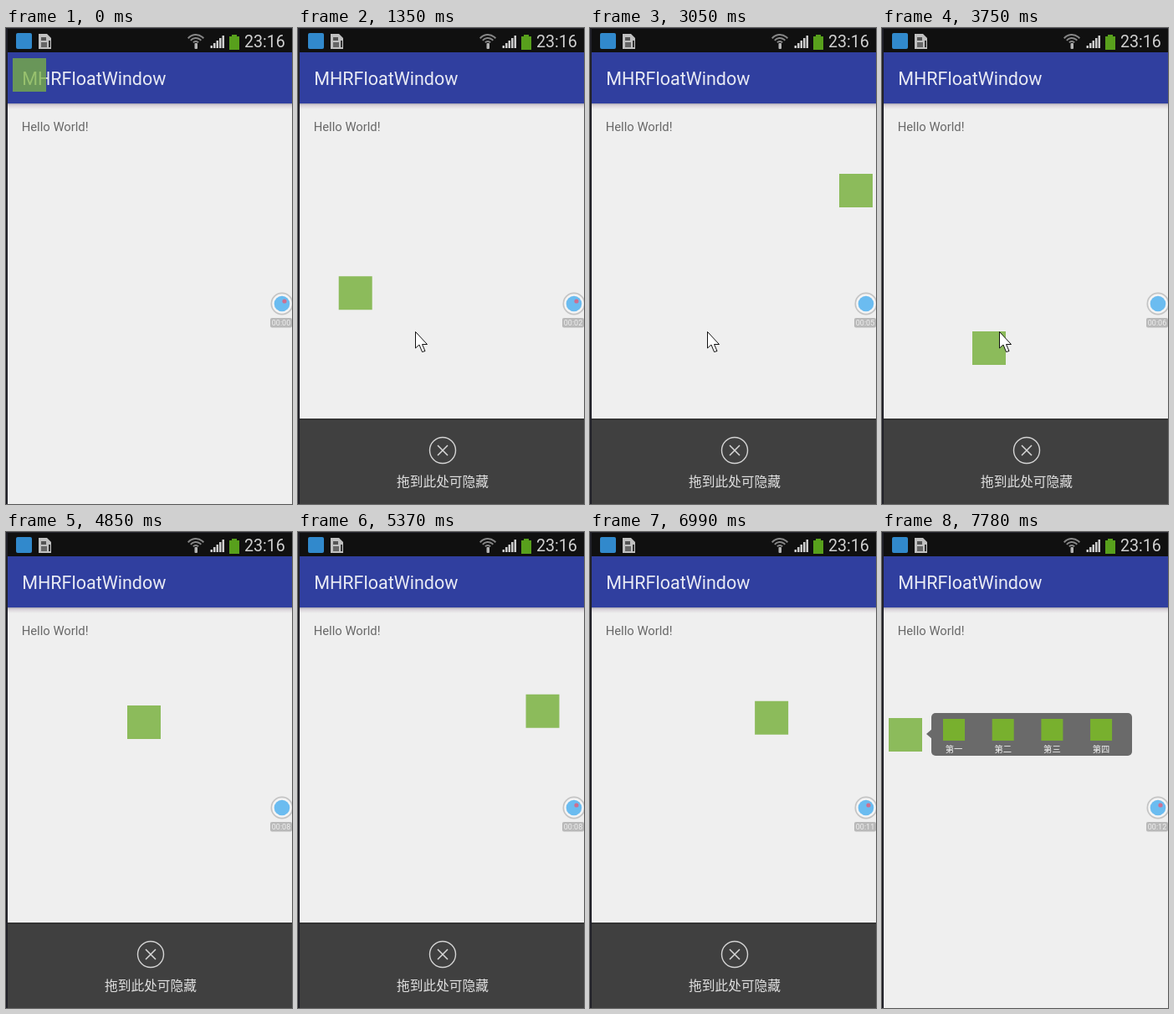
Recreate the animation shown at these times as an HTML page with a canvas. Size 342x568 px, loop 8000 ms.

```html
<!DOCTYPE html>
<html lang="zh">
<head>
<meta charset="utf-8">
<style>
html, body { margin: 0; width: 100%; height: 100%; overflow: hidden; background: #efefef; }
canvas { display: block; }
</style>
</head>
<body>
<canvas id="stage" width="342" height="568"></canvas>
<script>
const ctx = document.getElementById('stage').getContext('2d');
const LOOP = 8000;
const LATIN = 'Roboto, sans-serif';
const CJK = '"Noto Sans CJK SC", "Noto Sans CJK", sans-serif';

// Turning points of the drag: time, left, top
const PATH = [
  [720, 7, 33], [1850, 80, 500], [2050, 35, 517], [3050, 297, 171], [3500, 90, 389],
  [3750, 107, 359], [4150, 110, 500], [4850, 144, 204], [5450, 297, 188],
  [6790, 297, 188], [7250, 7, 219]
];
const within = (t, a, b) => t >= a && t < b;

function rect(x, y, w, h, color, r = 0) {
  ctx.fillStyle = color;
  ctx.beginPath();
  ctx.roundRect(x, y, w, h, r);
  ctx.fill();
}
function disc(x, y, r, color) {
  ctx.fillStyle = color;
  ctx.beginPath();
  ctx.arc(x, y, r, 0, 7);
  ctx.fill();
}
function arc(x, y, r, from, to, color, width) {
  ctx.strokeStyle = color;
  ctx.lineWidth = width;
  ctx.beginPath();
  ctx.arc(x, y, r, from, to);
  ctx.stroke();
}
function shape(points, fill, stroke) {
  ctx.beginPath();
  points.forEach(([x, y]) => ctx.lineTo(x, y));
  ctx.closePath();
  ctx.fillStyle = fill;
  ctx.fill();
  if (stroke) {
    ctx.strokeStyle = stroke;
    ctx.lineWidth = 1;
    ctx.stroke();
  }
}
function cross(x, y, r, color) {
  ctx.strokeStyle = color;
  ctx.lineWidth = 1.5;
  ctx.beginPath();
  for (const s of [-1, 1]) {
    ctx.moveTo(x - r, y - r * s);
    ctx.lineTo(x + r, y + r * s);
  }
  ctx.stroke();
}
function text(s, x, y, size, color, family = LATIN, align = 'left') {
  ctx.font = `${size}px ${family}`;
  ctx.textAlign = align;
  ctx.fillStyle = color;
  ctx.fillText(s, x, y);
}

function widgetAt(t) {
  const next = PATH.findIndex(p => p[0] > t);
  if (next === 0) return PATH[0].slice(1);
  if (next < 0) return PATH.at(-1).slice(1);
  const [t0, x0, y0] = PATH[next - 1], [t1, x1, y1] = PATH[next];
  const k = (t - t0) / (t1 - t0);
  return [x0 + (x1 - x0) * k, y0 + (y1 - y0) * k];
}

function drawStatusBar() {
  rect(0, 0, 342, 29, '#101010');
  rect(0, 0, 342, 1, '#24242c');
  rect(12, 6, 19, 19, '#3189cc', 2);

  shape([[39, 7], [49, 7], [54, 12], [54, 25], [39, 25]], '#c0c0c0');
  rect(42, 11, 6, 4, '#555');
  rect(42, 17, 7, 6, '#666');
  rect(51, 15, 2, 8, '#333');

  for (let r = 4; r < 13; r += 4) {
    arc(227, 20, r, -Math.PI * 0.78, -Math.PI * 0.22, '#858585', 2);
  }
  rect(225.5, 18, 3.5, 7, '#b4b4b4', 1);
  for (let i = 0; i < 5; i++) rect(244.5 + i * 3.5, 21 - i * 3, 2.5, 3 + i * 3, '#cecece');
  rect(270, 8, 6, 3, '#58a01c');
  rect(267, 10, 12, 16, '#58a01c');
  text('23:16', 285, 23, 19.6, '#d0d0d0');
}

function drawPage() {
  rect(0, 0, 342, 568, '#efefef');
  rect(0, 29, 342, 61, '#303f9f');
  const shade = ctx.createLinearGradient(0, 90, 0, 97);
  shade.addColorStop(0, '#a5a5b0');
  shade.addColorStop(0.3, '#d8d2d8');
  shade.addColorStop(1, '#efefef');
  rect(0, 90, 342, 7, shade);
  text('MHRFloatWindow', 19.2, 68, 21.5, '#e8eaf4');
  text('Hello World!', 18.7, 123, 14.8, '#686868');
  drawStatusBar();
  rect(0, 0, 2, 568, '#202028');
}

function drawPanel(active) {
  rect(2, 466, 340, 102, '#404040');
  rect(2, 466, 340, 2, '#343434');
  if (active) disc(173, 504, 16.5, '#f0d000');
  else arc(173, 504, 15.5, 0, 7, '#d4d4d4', 1.4);
  cross(173, 504, 6, active ? '#4a4424' : '#d8d8d8');
  text('拖到此处可隐藏', 173, 547, 15.7, active ? '#dcb808' : '#e0e0e0', CJK, 'center');
}

function drawMenu() {
  rect(59, 216, 240, 51, '#6a6a6a', 5);
  shape([[53, 241], [60, 235], [60, 247]], '#6a6a6a');
  [...'一二三四'].forEach((digit, i) => {
    const x = 86 + i * 58.7;
    rect(x - 13, 223, 26, 26, '#78b02e');
    text('第' + digit, x, 262.5, 10.3, '#f4f4f4', CJK, 'center');
  });
}

function drawRecorder(t) {
  disc(330, 329, 13.5, '#c4c4c4');
  disc(330, 329, 11.8, '#f4f4f4');
  disc(330, 329, 9.3, '#6bbcf0');
  const blinking = t > 4950 && (t - 4950) % 1390 < 920;
  if (t < 2350 || blinking) disc(333, 326, 2.6, '#cf6f8f');
  const seconds = Math.max(0, Math.floor((t - 50) / 600));
  rect(316, 346, 26, 11.5, '#b9b9b9', 2);
  text('00:' + String(seconds).padStart(2, '0'), 329, 355, 9, '#f0f0f0', LATIN, 'center');
}

function drawHint() {
  ctx.lineWidth = 3;
  ctx.strokeStyle = '#0a1030';
  ctx.font = `14.5px ${CJK}`;
  ctx.textAlign = 'left';
  ctx.strokeText('播放', 13.5, 28.5);
  text('播放', 13.5, 28.5, 14.5, '#4068e0', CJK);
}

function drawCursor(x, y) {
  const arrow = [[0, 0], [0, 19.5], [4.5, 15.5], [8, 24], [11.5, 23], [8, 15], [14, 15]];
  shape(arrow.map(([dx, dy]) => [x + dx, y + dy]), '#fff', '#111');
}

function draw(t) {
  const held = Math.floor((t - 50) / 100) * 100 + 50; // the drag advances ten times a second
  const [x, y] = widgetAt(held);
  drawPage();
  if (within(t, 850, 5570) || within(t, 6870, 7280)) drawPanel(y > 440);
  if (t >= 7360) drawMenu();

  ctx.globalAlpha = t < 720 ? 0.75 : 0.85;
  rect(x + 1, y + 3, 40, 40, '#7cb342');
  ctx.globalAlpha = 1;
  drawRecorder(t);

  if (within(t, 1950, 2150)) drawHint();
  if (within(t, 1350, 4250)) drawCursor(140.5, 362.5);
}

function frame() {
  draw(performance.now() % LOOP);
  requestAnimationFrame(frame);
}
frame();
</script>
</body>
</html>
```
